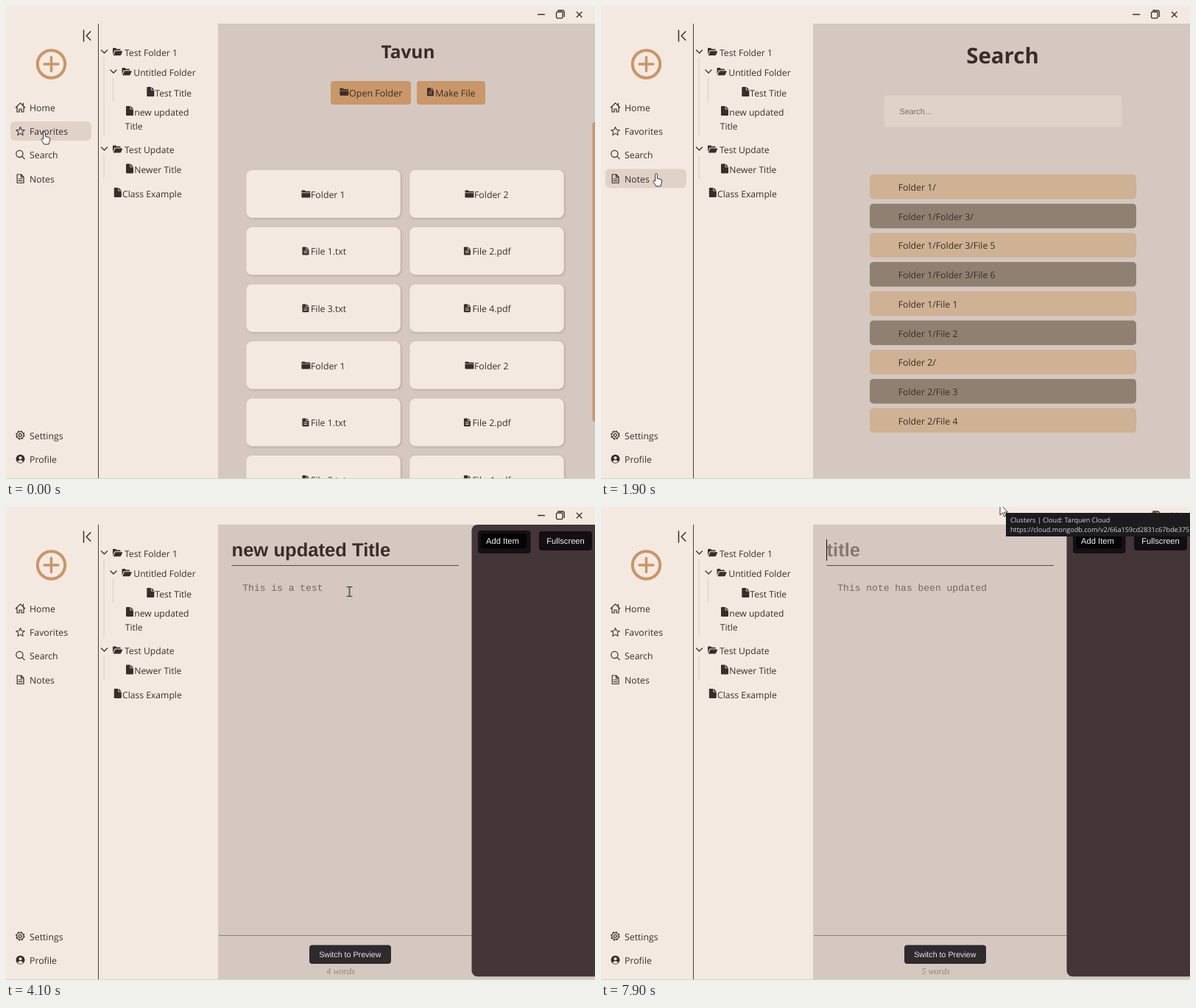
An HTML page for the animation above (8 s loop, 800 by 643 pixels).

```html
<!DOCTYPE html>
<html lang="en">
<head>
<meta charset="utf-8">
<title>Notes app</title>
<style>
html, body { margin: 0; width: 100%; height: 100%; overflow: hidden; background: #f4e9e0; }
svg { display: block; width: 800px; height: 643px; }
text { font: 12.3px "Open Sans", "Noto Sans", sans-serif; fill: #3a2d29; white-space: pre; text-rendering: geometricPrecision; }
.mid { text-anchor: middle; }
.tree text { font-size: 12.15px; }
.btn { font-size: 12.5px; }
.h1 { font-weight: 700; font-size: 29.4px; }
.h2 { font-weight: 700; font-size: 20.85px; }
.name { font-weight: 700; font-size: 15.4px; }
.ui { font-family: "Liberation Sans", Arial, sans-serif; }
.title { font: 700 25.6px "Liberation Sans", Arial, sans-serif; }
.body { font: 13px "Liberation Mono", "Courier New", monospace; fill: #76675f; }
.words { font: italic 12.2px "Liberation Serif", Times, serif; fill: #90867f; }
.tip text { font-size: 9.1px; fill: #d9d8da; }
.ink { fill: #3a2d29; }
.line { fill: none; stroke: #3a2d29; stroke-width: 1.2; stroke-linecap: round; stroke-linejoin: round; }
.hover { fill: #e0d2c9; }
.card { filter: drop-shadow(1.5px 1.5px 1.5px rgba(90, 70, 60, .28)); }

.show { opacity: 0; animation: 8s step-end infinite; }
#home { animation-name: home; }
#fav { animation-name: fav; }
#search { animation-name: search; }
#note { animation-name: note; }
#overFav { animation-name: overFav; }
#overSearch { animation-name: overSearch; }
#overNotes { animation-name: overNotes; }
#overFile { animation-name: overFile; }
#overFolder { animation-name: overFolder; }
#hand { animation-name: hand; }
#beam { animation-name: beam; }
#arrow { animation-name: arrow; }
#tip { animation-name: tip; }
@keyframes home { 0% { opacity: 1 } 1.25%, 100% { opacity: 0 } }
@keyframes fav { 0% { opacity: 0 } 1.25% { opacity: 1 } 15%, 100% { opacity: 0 } }
@keyframes search { 0% { opacity: 0 } 15% { opacity: 1 } 25%, 100% { opacity: 0 } }
@keyframes note { 0% { opacity: 0 } 25%, 100% { opacity: 1 } }
@keyframes overFav { 0% { opacity: 1 } 11.25%, 100% { opacity: 0 } }
@keyframes overSearch { 0% { opacity: 0 } 11.25% { opacity: 1 } 20.5%, 100% { opacity: 0 } }
@keyframes overNotes { 0% { opacity: 0 } 20.5% { opacity: 1 } 26%, 100% { opacity: 0 } }
@keyframes overFile { 0% { opacity: 0 } 27% { opacity: 1 } 29.8%, 100% { opacity: 0 } }
@keyframes overFolder { 0% { opacity: 0 } 30.2% { opacity: 1 } 32.4%, 100% { opacity: 0 } }
@keyframes hand { 0% { opacity: 1 } 32.6%, 100% { opacity: 0 } }
@keyframes beam { 0% { opacity: 0 } 32.6% { opacity: 1 } 95.2%, 100% { opacity: 0 } }
@keyframes arrow { 0% { opacity: 0 } 95.2%, 100% { opacity: 1 } }
@keyframes tip { 0% { opacity: 0 } 98%, 100% { opacity: 1 } }

#mouse { animation: mouse 8s ease-in-out infinite; }
@keyframes mouse {
  0%, 10% { transform: translate(52px, 171px) }
  12.5%, 18.75% { transform: translate(52px, 203px) }
  22.5%, 25% { transform: translate(75px, 228px) }
  28%, 29.1% { transform: translate(205px, 139px) }
  31%, 31.6% { transform: translate(222px, 86px) }
  35%, 85.6% { transform: translate(466.5px, 115px) }
  87.5%, 94.4% { transform: translate(521px, 64px) }
  97.5%, 100% { transform: translate(542px, -4px) }
}
</style>
</head>
<body>
<svg viewBox="0 0 800 643">
  <defs>
    <path id="open" class="ink" d="M0 10V1.8Q0 .8 1 .8H4l1.4 1.4H9.6q1 0 1 1V4H3.4Q2.4 4 2 5zM.8 11 3 5.4Q3.2 4.9 3.8 4.9H12.6q.8 0 .5.8L11.2 10.2Q10.8 11 10 11z"/>
    <path id="folder" class="ink" d="M0 1Q0 0 1 0H4.2L5.6 1.2H11q1 0 1 1V3H0zM0 3.7H12V9q0 1-1 1H1Q0 10 0 9z"/>
    <path id="file" class="ink" d="M1 0H5.6V4q0 .6.6.6H10V12q0 1-1 1H1Q0 13 0 12V1Q0 0 1 0zM6.4 0 10 3.8H6.4z"/>
    <path id="doc" class="ink" fill-rule="evenodd" d="M1 0H5V3q0 .6.6.6H9V10q0 1-1 1H1Q0 11 0 10V1Q0 0 1 0zM5.8 0 9 2.9H5.8zM2 5.2H7V6.1H2zM2 7.6H7V8.5H2z"/>
    <path id="star" stroke-linejoin="round" d="M0-7 1.88-2.59 6.66-2.16 3.04.99 4.11 5.66 0 3.2-4.11 5.66-3.04.99-6.66-2.16-1.88-2.59z"/>
    <path id="chev" class="line" style="stroke-width:1.3" d="M-4-2 0 2 4-2"/>
  </defs>

  <rect width="800" height="643" fill="#f4e9e0"/>
  <rect x="288" y="24" width="512" height="619" fill="#d4c8c1"/>

  <!-- window controls -->
  <g class="line" style="stroke-width:1.3">
    <path d="M722.5 11.5H731.5M775.3 8.2 782 15M782 8.2 775.3 15"/>
    <rect x="747.5" y="8" width="8.6" height="8.6" rx="2"/>
    <path d="M749.6 6H755.6Q758.3 6 758.3 8.7V14.4"/>
  </g>

  <!-- sidebar -->
  <rect x="125" y="24" width="1" height="619" fill="#4a403b"/>
  <path class="line" style="stroke-width:1.5" d="M105.5 33V48M114.8 34.8 109.2 40.5 114.8 46.2"/>
  <g fill="none" stroke="#ca9565" stroke-width="4">
    <circle cx="61.5" cy="79" r="18.7"/>
    <path stroke-width="3.4" d="M61.5 69.5V88.5M52 79H71" stroke-linecap="round"/>
  </g>
  <rect id="overFav" class="show hover" x="6" y="157" width="110" height="26" rx="6"/>
  <rect id="overSearch" class="show hover" x="6" y="189.3" width="110" height="26" rx="6"/>
  <rect id="overNotes" class="show hover" x="6" y="221.5" width="110" height="26" rx="6"/>
  <g class="line">
    <path d="M13.3 138 19.5 131.8 25.7 138M15 137V144H18V140H21V144H24V137M23.4 132V135"/>
    <use href="#star" transform="translate(19.5 170.6) scale(.88)"/>
    <circle cx="18.4" cy="201" r="4.6"/><path d="M21.8 204.4 25.2 207.8"/>
    <path d="M15.2 229H20.6L24 232.4V240.5H15.2ZM20.4 229.2V232.6H23.8M17.2 235H22M17.2 237.6H22"/>
    <circle cx="19.3" cy="583.3" r="4.7"/><circle cx="19.3" cy="583.3" r="2"/>
    <circle cx="19.3" cy="583.3" r="5.6" stroke-linecap="butt" stroke-dasharray="2.2 2.2"/>
  </g>
  <circle class="ink" cx="19.5" cy="615.8" r="6"/>
  <circle cx="19.5" cy="614.2" r="2" fill="#f4e9e0"/>
  <path d="M15.8 619.3Q17 617.3 19.5 617.3T23.2 619.3Q21.8 620.9 19.5 620.9T15.8 619.3z" fill="#f4e9e0"/>
  <text x="32" y="143">Home</text>
  <text x="32" y="175">Favorites</text>
  <text x="32" y="207.3">Search</text>
  <text x="32" y="239.6">Notes</text>
  <text x="32" y="588.5">Settings</text>
  <text x="32" y="620.8">Profile</text>

  <!-- file tree -->
  <rect id="overFile" class="show hover" x="152" y="131" width="113" height="45" rx="5"/>
  <rect id="overFolder" class="show hover" x="152" y="77" width="113" height="26" rx="5"/>
  <path d="M133 71V176M145.5 98V130M133 203V235" stroke="#d8cbc2"/>
  <use href="#chev" x="133.5" y="62"/><use href="#chev" x="146" y="89"/><use href="#chev" x="133.5" y="194"/>
  <use href="#open" x="145" y="56.3"/><use href="#open" x="157.5" y="83.3"/><use href="#open" x="145" y="188.6"/>
  <use href="#file" x="191.3" y="110"/><use href="#file" x="163" y="136"/>
  <use href="#file" x="163" y="214.6"/><use href="#file" x="146.8" y="247"/>
  <g class="tree">
    <text x="161" y="68.3">Test Folder 1</text>
    <text x="173.3" y="95.2">Untitled Folder</text>
    <text x="202.3" y="122.5">Test Title</text>
    <text x="174.3" y="148.8">new updated</text>
    <text x="161.7" y="168">Title</text>
    <text x="161" y="200.3">Test Update</text>
    <text x="174.3" y="227.3">Newer Title</text>
    <text x="158" y="259.6">Class Example</text>
  </g>

  <g id="home" class="show">
    <text class="h1 mid" x="546" y="71" style="font-size:24.4px">Tavun</text>
    <g fill="#c99768">
      <rect x="441" y="102" width="109" height="32" rx="4"/>
      <rect x="558" y="102" width="93" height="32" rx="4"/>
    </g>
    <use href="#folder" x="453.3" y="111.8"/><text class="btn" x="466" y="122.6">Open Folder</text>
    <use href="#doc" x="572" y="111.3"/><text class="btn" x="583" y="122.6">Make File</text>
    <g id="cards"></g>
    <rect x="796.5" y="158" width="8" height="407" rx="3" fill="#c99768"/>
  </g>

  <g id="fav" class="show">
    <text class="h1 mid" x="546" y="77.5">Favorites</text>
    <text class="h2" x="313.5" y="173.6">Favorite Folders</text>
    <text class="h2" x="313.5" y="307">Favorite Files</text>
    <g id="favs"></g>
  </g>

  <g id="search" class="show">
    <text class="h1 mid" x="545.5" y="77.5">Search</text>
    <rect x="384.5" y="121.5" width="323" height="43" rx="4" fill="#e0d2c9"/>
    <text class="ui" x="405.5" y="146.5" style="font-size:10.8px;fill:#776d68">Search...</text>
    <g id="rows"></g>
  </g>

  <g id="note" class="show">
    <text id="holder" class="title" x="306.5" y="67" style="fill:#857972">title</text>
    <text id="title" class="title" x="306.5" y="67"></text>
    <path d="M306.5 79.5H615" stroke="#574a45"/>
    <text id="body" class="body" x="321.3" y="113.6"></text>
    <rect id="caret" width="1.1" fill="#1d1715"/>
    <path d="M289 582.5H633" stroke="#8d827b"/>
    <rect x="412" y="595.5" width="111" height="25.5" rx="4" fill="#2e2a2e"/>
    <text class="ui mid" x="467.3" y="611.8" style="font-size:10.7px;fill:#e9e5e5">Switch to Preview</text>
    <text id="words" class="words mid" x="454.5" y="634.5"></text>
    <rect x="632.5" y="24" width="180" height="614.3" rx="8" fill="#433538"/>
    <rect x="641" y="32" width="71.5" height="31" rx="4" fill="#141013"/>
    <rect x="645" y="36" width="62" height="20.5" rx="3" fill="#060506"/>
    <rect x="724" y="33" width="72" height="26" rx="4" fill="#120e11"/>
    <g style="font-size:11.2px">
      <text class="ui mid" x="674.5" y="49.6" style="font-size:inherit;fill:#f3f0f0">Add Item</text>
      <text class="ui mid" x="760" y="49.6" style="font-size:inherit;fill:#f3f0f0">Fullscreen</text>
    </g>
  </g>

  <rect y="642" width="800" height="1" fill="#cdd9b4"/>

  <g id="mouse">
    <path id="hand" class="show" fill="#fff" stroke="#1a1a1a" stroke-width=".9" d="M-1.4 1.3a1.4 1.4 0 0 1 2.8 0V6.6l4.6.9q2 .5 1.8 2.6L7 13.5 6 17H-.2L-3.6 11.6q-1-1.6.2-2.1t2 .8z"/>
    <path id="beam" class="show" fill="none" stroke="#222" stroke-width="1.2" d="M-3.7-6.5H-1.2L0-5.7 1.2-6.5H3.7M0-5.7V5.7M-3.7 6.5H-1.2L0 5.7 1.2 6.5H3.7"/>
    <path id="arrow" class="show" fill="#fff" stroke="#222" stroke-width=".9" d="M0 0V15L3.4 11.8 5.6 17 7.8 16 5.6 11H10.5z"/>
  </g>

  <g id="tip" class="show tip">
    <rect x="550" y="8" width="260" height="32" fill="#1c1b1e"/>
    <text x="556" y="21.2">Clusters | Cloud: Tarquen Cloud</text>
    <text x="556" y="33.8">https://cloud.mongodb.com/v2/66a159cd2831c67bde375</text>
  </g>
</svg>

<script>
const $ = id => document.getElementById(id);
const rect = (x, y, w, h, r, fill, cls = '') =>
  `<rect class="${cls}" x="${x}" y="${y}" width="${w}" height="${h}" rx="${r}" fill="${fill}"/>`;
const text = (x, y, str, cls = '') => `<text class="${cls}" x="${x}" y="${y}">${str}</text>`;
const icon = (id, x, y) => `<use href="#${id}" x="${x}" y="${y}"/>`;

const items = ['Folder 1', 'Folder 2', 'File 1.txt', 'File 2.pdf', 'File 3.txt', 'File 4.pdf'];
$('cards').innerHTML = Array.from({ length: 12 }, (_, i) => {
  const right = i % 2, name = items[i % 6], isFolder = name.startsWith('Folder');
  const x = right ? 548.3 : 326.3, y = 223 + 77.6 * (i >> 1);
  const tx = right ? (isFolder ? 636 : 633.5) : 414;
  return rect(x, y, 209.5, 65, 8, '#f4e9e0', 'card') +
    (isFolder ? icon('folder', tx - 12.6, y + 27.6) : icon('doc', tx - 11.6, y + 27)) +
    text(tx, y + 37.7, name);
}).join('');

$('favs').innerHTML = [0, 1, 2].map(i => {
  const x = 313.5 + 127.6 * i, fx = 313.5 + 168 * i, mid = fx + 77.3;
  return rect(x, 206.5, 114.5, 51.5, 5, '#e1d3c9', 'card') +
    `<use href="#star" x="${x + 20.7}" y="232.5" fill="#f6e13c" stroke="#f6e13c"/>` +
    text(x + 42, 238, 'folder' + (i + 1), 'name') +
    rect(fx, 331, 155.5, 167.5, 6, '#e1d3c9', 'card') +
    text(mid, 361.7, 'file' + (i + 4), 'name mid') +
    rect(fx + 32, 380.5, 90.5, 100, 8, '#f9f8fa') +
    `<g transform="translate(${mid} 430.5)" fill="none" stroke="#e3d6cc" stroke-width="1.3">
      <rect x="-12.7" y="-14" width="25.4" height="28" rx="4"/><circle cx="4.5" cy="-6" r="2"/>
      <path d="M-12.5 8-5-1.5 2 7.5 6 2.5 12.5 8.5"/></g>`;
}).join('');

const paths = ['1/', '1/Folder 3/', '1/Folder 3/File 5', '1/Folder 3/File 6', '1/File 1', '1/File 2', '2/', '2/File 3', '2/File 4'];
$('rows').innerHTML = paths.map((p, i) => {
  const y = 229 + 39.7 * i;
  return rect(365, y, 362, 33.5, 5, i % 2 ? '#8f8071' : '#cfb193') + text(403.7, y + 22, 'Folder ' + p);
}).join('');

const LOOP = 8000, OPENED = 2300, CLICKED = 3300, ERASE = 4450, TYPE = 5040, RETITLE = 7000;
const before = 'This is a test', after = 'This note has been updated', heading = 'new updated Title';
const steps = (t, from, each) => Math.max(0, Math.floor((t - from) / each));

function bodyAt(t) {
  if (t < OPENED) return '';
  if (t < TYPE) return before.slice(0, Math.max(5, before.length - steps(t, ERASE, 60)));
  return after.slice(0, 5 + steps(t, TYPE, 84));
}

function titleAt(t) {
  if (t < OPENED) return '';
  return heading.slice(0, Math.max(0, heading.length - steps(t, RETITLE + 50, 32)));
}

function draw(t) {
  const body = bodyAt(t), title = titleAt(t), inTitle = t >= RETITLE;
  const count = body.split(' ').filter(Boolean).length;
  $('body').textContent = body;
  $('title').textContent = title;
  $('holder').style.display = title ? 'none' : '';
  $('words').textContent = count + ' words';

  const blink = t >= ERASE || (t - CLICKED) % 1060 < 530;
  const caret = $('caret');
  caret.style.display = t >= CLICKED && blink ? '' : 'none';
  caret.setAttribute('x', inTitle ? 306 + (title ? $('title').getComputedTextLength() : 0) : 321 + 7.8 * body.length);
  caret.setAttribute('y', inTitle ? 44 : 103.5);
  caret.setAttribute('height', inTitle ? 29 : 14);
}

let start;
function tick(now) {
  start ??= now;
  draw((now - start) % LOOP);
  requestAnimationFrame(tick);
}
requestAnimationFrame(tick);
</script>
</body>
</html>
```
